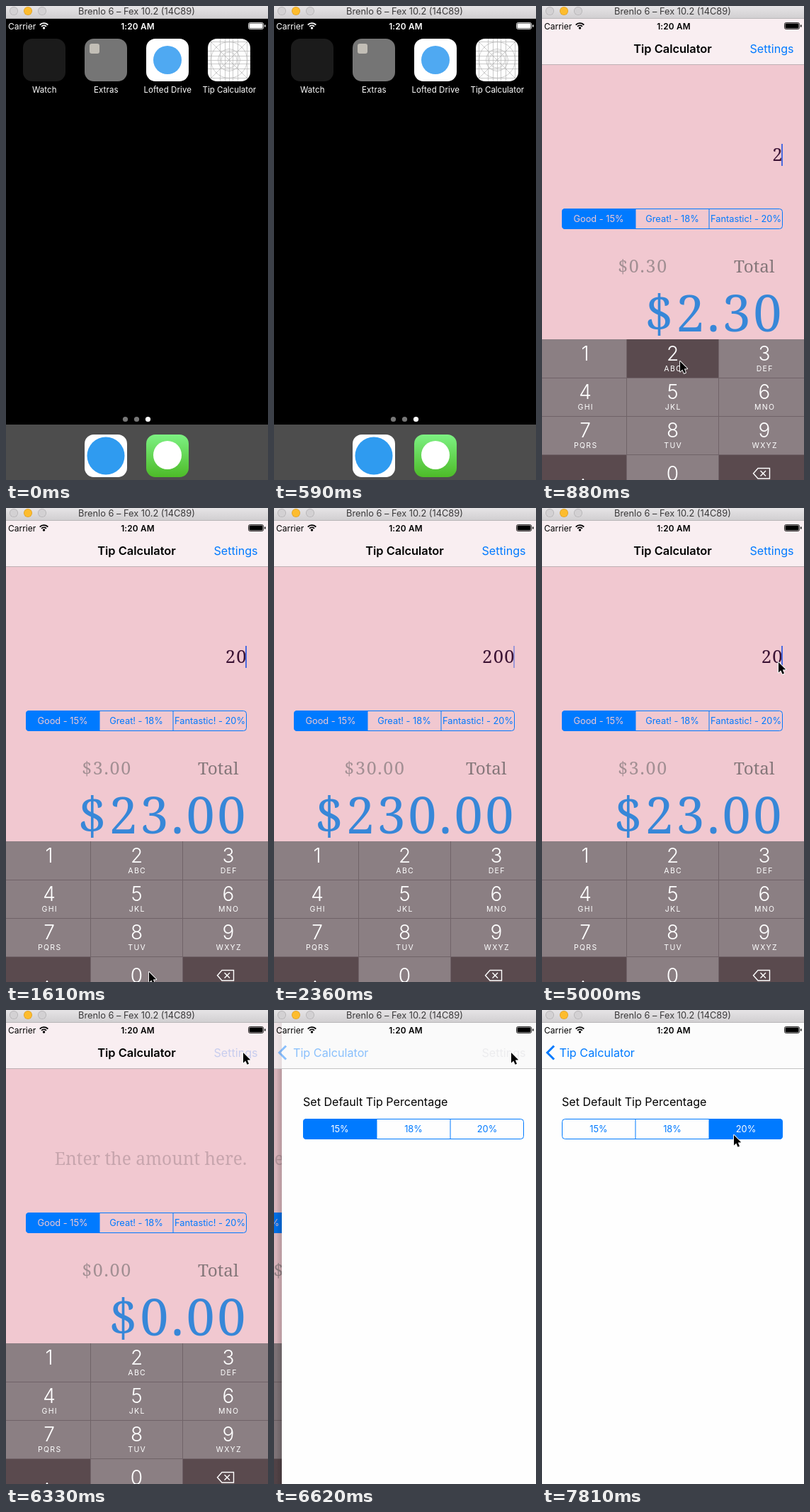
Write an HTML page with a canvas that moves like this. It is 370x667 px and loops after 8000 ms.

```html
<!DOCTYPE html>
<html lang="en">
<head>
<meta charset="utf-8">
<title>Tip Calculator</title>
<style>
  html, body { margin: 0; width: 100%; height: 100%; overflow: hidden; background: #000; }
  canvas { display: block; width: 370px; height: 667px; }
</style>
</head>
<body>
<canvas id="stage"></canvas>
<script>
const W = 370, H = 667, LOOP = 8000, TICK = 147.2;
const SANS = 'Inter, "Liberation Sans", sans-serif';
const SLAB = '"Noto Serif", "Liberation Serif", serif';
const BLUE = '#007aff', PINK = '#f1c8d0';

const canvas = document.getElementById('stage');
const dpr = window.devicePixelRatio || 1;
canvas.width = W * dpr;
canvas.height = H * dpr;
const ctx = canvas.getContext('2d');

// Step tables: [first tick, value]
const BILL = [[0, '2'], [10, '20'], [12, '200'], [34, '20'], [35, '2'], [36, '']];
const CARET = [[0, 1], [16, .5], [17, 0], [19, .5], [20, 1], [23, .5], [24, 0], [26, .5],
  [27, 1], [31, .5], [32, 0], [34, 1], [39, .5], [40, 0]];
const PRESSED_KEY = [[0, '2'], [7, ''], [10, '0'], [11, ''], [12, '0'], [13, '']];

// Pointer runs: [tick, x, y]
const POINTER = [
  [[6, 195, 500], [7, 196, 545], [9, 202, 653], [13, 202, 653]],
  [[19, 244, 470], [20, 268, 320], [22, 308, 81], [23, 304, 160], [26, 262, 538],
   [27, 295, 420], [28, 326, 270], [29, 334, 217], [38, 334, 217], [40, 337, 150],
   [42, 335, 60], [45, 335, 60], [48, 300, 130], [50, 271, 176], [60, 271, 176]]
];

const stepAt = (table, tick) => table.filter(([from]) => from <= tick).pop()[1];

function pointerAt(tick) {
  const run = POINTER.find(r => tick >= r[0][0] && tick <= r[r.length - 1][0]);
  if (!run) return null;
  const i = Math.max(1, run.findIndex(([at]) => at >= tick));
  const [t0, x0, y0] = run[i - 1], [t1, x1, y1] = run[i];
  const p = (tick - t0) / (t1 - t0);
  return [x0 + (x1 - x0) * p, y0 + (y1 - y0) * p];
}

function text(str, x, y, size, color, { align = 'left', weight = 400, font = SANS, gap = 0 } = {}) {
  ctx.font = `${weight} ${size}px ${font}`;
  ctx.letterSpacing = gap + 'px';
  ctx.textAlign = align;
  ctx.fillStyle = color;
  ctx.fillText(str, x, y);
}

function rect(x, y, w, h, color) {
  ctx.fillStyle = color;
  ctx.fillRect(x, y, w, h);
}

function round(x, y, w, h, r, color) {
  ctx.beginPath();
  ctx.roundRect(x, y, w, h, r);
  ctx.fillStyle = color;
  ctx.fill();
}

function disc(x, y, r, color) {
  ctx.beginPath();
  ctx.arc(x, y, r, 0, Math.PI * 2);
  ctx.fillStyle = color;
  ctx.fill();
}

function line(points, color, width = 1) {
  ctx.beginPath();
  points.forEach(([x, y]) => ctx.lineTo(x, y));
  ctx.strokeStyle = color;
  ctx.lineWidth = width;
  ctx.stroke();
}

function vertical(y0, y1, stops) {
  const g = ctx.createLinearGradient(0, y0, 0, y1);
  stops.forEach((c, i) => g.addColorStop(i / (stops.length - 1), c));
  return g;
}

function windowBar() {
  rect(0, 0, W, 18, vertical(0, 18, ['#e6e4e6', '#d0ced0']));
  rect(0, 17, W, 1, '#b9b7b9');
  for (const x of [11, 31, 51]) {
    const active = x === 31;
    disc(x, 7, 6, active ? '#dfa023' : '#b4b2b4');
    disc(x, 7, 5.2, active ? '#fdbc2e' : '#d3d1d3');
  }
  text('Brenlo 6 – Fex 10.2 (14C89)', 184.5, 12, 12.8, '#3a393a', { align: 'center' });
}

function statusBar(color) {
  text('Carrier', 3, 32.5, 12, color);
  text('1:20 AM', 186, 32.5, 11.8, color, { align: 'center', weight: 600, gap: .2 });
  ctx.strokeStyle = color;
  ctx.lineWidth = 1.8;
  for (const r of [4.6, 7.9]) {
    ctx.beginPath();
    ctx.arc(53.5, 32, r, -Math.PI * .76, -Math.PI * .24);
    ctx.stroke();
  }
  disc(53.5, 31, 1.7, color);
  ctx.beginPath();
  ctx.roundRect(342.5, 23.5, 21, 9, 2);
  ctx.lineWidth = .8;
  ctx.stroke();
  round(343.5, 24.5, 19, 7, 1, color);
  rect(365, 26.5, 1.5, 3, color);
}

function gridIcon(x, y) {
  const c = x + 30, m = y + 30, grey = '#b3b3b3';
  ctx.save();
  round(x, y, 60, 60, 13, '#fff');
  ctx.clip();
  for (const d of [4.5, 17.5, 24.5, 30.5, 35.5, 42.5, 55.5]) {
    line([[x + d, y], [x + d, y + 60]], grey, .7);
    line([[x, y + d], [x + 60, y + d]], grey, .7);
  }
  line([[x, y], [x + 60, y + 60]], grey, .7);
  line([[x + 60, y], [x, y + 60]], grey, .7);
  for (const r of [11, 15.5, 25.5]) {
    ctx.beginPath();
    ctx.arc(c, m, r, 0, Math.PI * 2);
    ctx.stroke();
  }
  ctx.restore();
}

function homeScreen() {
  rect(0, 18, W, H - 18, '#000');
  statusBar('#fff');
  round(24, 46, 60, 60, 13, '#1b1b1b');
  round(111, 46, 60, 60, 13, '#757575');
  round(118, 53, 14, 14, 3, '#c2beb6');
  round(198, 46, 60, 60, 13, '#fff');
  disc(228, 76, 20, '#4fa9f2');
  gridIcon(285, 46);
  ['Watch', 'Extras', 'Lofted Drive', 'Tip Calculator'].forEach((name, i) =>
    text(name, 54.3 + i * 87, 122, 11.5, '#fff', { align: 'center', gap: i === 3 ? 0 : .1 }));
  [168.5, 184.5, 200.5].forEach((x, i) => disc(x, 581.5, 3.6, i === 2 ? '#fff' : '#777'));
  rect(0, 589, W, 78, '#4d4d4d');
  round(111, 603, 60, 60, 13, '#fff');
  disc(141, 633, 26.5, '#2f9bf0');
  round(198, 603, 60, 60, 13, vertical(603, 663, ['#7df183', '#4dbb28']));
  disc(228, 632, 20, '#fff');
}

function segments(x, y, labels, selected, knockout, touched = -1) {
  const w = 312, h = 29, cell = w / 3;
  ctx.save();
  ctx.beginPath();
  ctx.roundRect(x, y, w, h, 4.5);
  ctx.clip();
  rect(x + selected * cell, y, cell, h, BLUE);
  if (touched >= 0) rect(x + touched * cell, y, cell, h, 'rgba(0,122,255,.2)');
  ctx.restore();
  ctx.beginPath();
  ctx.roundRect(x + .5, y + .5, w - 1, h - 1, 4);
  ctx.strokeStyle = BLUE;
  ctx.lineWidth = 1;
  ctx.stroke();
  labels.forEach((label, i) => {
    if (i) rect(Math.floor(x + i * cell) - .5, y, 1, h, BLUE);
    text(label, x + (i + .5) * cell, y + 19, 12.8, i === selected ? knockout : BLUE, { align: 'center' });
  });
}

function keypad(pressed) {
  const keys = [['1', ''], ['2', 'ABC'], ['3', 'DEF'], ['4', 'GHI'], ['5', 'JKL'], ['6', 'MNO'],
    ['7', 'PQRS'], ['8', 'TUV'], ['9', 'WXYZ'], ['.', ''], ['0', ''], ['del', '']];
  const edges = [0, 120, 250, W], centers = [61, 184.5, 314];
  keys.forEach(([digit, letters], i) => {
    const col = i % 3, row = Math.floor(i / 3), y = 469 + row * 54;
    const dark = digit === '.' || digit === 'del' || digit === pressed;
    rect(edges[col], y, edges[col + 1] - edges[col], 54, dark ? '#5a4a4e' : '#8b7f83');
    if (digit === 'del') return;
    const baseline = y + (row === 3 ? 36.5 : 30);
    text(digit, digit === '.' ? 58 : centers[col], baseline, 28, '#fff', { align: 'center', weight: 300 });
    text(letters, centers[col] + .7, y + 45, 10.5, '#fff', { align: 'center', gap: 1.3 });
  });
  for (const y of [523, 577, 631]) rect(0, y, W, 1, '#706368');
  for (const x of [119, 249]) rect(x, 469, 1, H - 469, '#706368');
  line([[305, 650.5], [321.5, 650.5], [321.5, 665], [305, 665], [298.5, 657.8], [305, 650.5], [307, 650.5]], '#fff', 1.4);
  line([[308.5, 654], [316, 661.5]], '#fff', 1.4);
  line([[316, 654], [308.5, 661.5]], '#fff', 1.4);
}

function calculatorBody(tick) {
  const bill = stepAt(BILL, tick), amount = Number(bill), tip = amount * .15;
  const money = n => '$' + n.toFixed(2);
  rect(0, 18, W, H - 18, PINK);
  if (bill) text(bill, 341, 218, 25.5, '#3b1233', { align: 'right', font: SLAB, weight: 300, gap: 1.4 });
  else text('Enter the amount here.', 340, 218, 24.5, '#c7a5ad', { align: 'right', font: SLAB, weight: 300 });
  ctx.globalAlpha = stepAt(CARET, tick);
  rect(338, 194, 2, 31, '#4a6be0');
  ctx.globalAlpha = 1;
  segments(28, 285, ['Good - 15%', 'Great! - 18%', 'Fantastic! - 20%'], 0, PINK);
  text(money(tip), 142.5, 375, 25, '#a28f93', { align: 'center', font: SLAB, weight: 300, gap: 1.7 });
  text('Total', 271, 375, 24.3, '#85777a', { font: SLAB, weight: 300 });
  text(money(amount + tip), 342, 458, 72, '#3787d8', { align: 'right', font: SLAB, weight: 300, gap: 3.5 });
  keypad(stepAt(PRESSED_KEY, tick));
}

function navBar(fill, edge) {
  rect(0, 18, W, 64, fill);
  rect(0, 82, W, 1, edge);
}

function calculatorScreen(tick) {
  calculatorBody(tick);
  navBar('#f9eef1', '#bfb0b4');
  statusBar('#000');
  text('Tip Calculator', 184.5, 66, 16.4, '#000', { align: 'center', weight: 600 });
  text('Settings', 355.5, 66, 16.1, tick === 43 ? '#c8cdee' : BLUE, { align: 'right' });
}

function settingsScreen(tick) {
  const sliding = tick === 45, offset = sliding ? 13 : 0;
  if (sliding) {
    ctx.save();
    ctx.translate(-108, 0);
    calculatorBody(tick);
    ctx.restore();
    rect(0, 18, W, H - 18, 'rgba(0,0,0,.1)');
    const shade = ctx.createLinearGradient(3, 0, 11, 0);
    shade.addColorStop(0, 'rgba(0,0,0,0)');
    shade.addColorStop(1, 'rgba(0,0,0,.16)');
    rect(3, 18, 8, H - 18, shade);
  }
  rect(sliding ? 11 : 0, 18, W, H - 18, '#fefefe');
  navBar(sliding ? 'rgba(250,249,249,.7)' : '#fcfcfc', '#c4c4c4');
  statusBar('#000');
  ctx.globalAlpha = sliding ? .45 : 1;
  line([[17, 50.5], [7.5, 60], [17, 69.5]], BLUE, 3);
  text('Tip Calculator', sliding ? 27 : 24.5, 66, 16.2, BLUE);
  ctx.globalAlpha = 1;
  if (sliding) text('Settings', 355.5, 66, 16.1, '#ececee', { align: 'right' });
  text('Set Default Tip Percentage', 28 + offset, 134.5, 16.1, '#000');
  segments(28 + offset, 153, ['15%', '18%', '20%'], tick >= 53 ? 2 : 0, '#fff', tick === 52 ? 2 : -1);
}

function pointer(x, y) {
  ctx.save();
  ctx.translate(x, y);
  ctx.beginPath();
  [[0, 0], [0, 14.5], [3.3, 11.4], [5.6, 16.8], [8, 15.8], [5.8, 10.5], [10.2, 10.3]]
    .forEach(([px, py]) => ctx.lineTo(px, py));
  ctx.closePath();
  ctx.lineJoin = 'round';
  ctx.lineWidth = 1.8;
  ctx.strokeStyle = '#fff';
  ctx.stroke();
  ctx.fillStyle = '#000';
  ctx.fill();
  ctx.restore();
}

function draw(now) {
  const tick = Math.floor((now % LOOP) / TICK + .13);
  ctx.setTransform(dpr, 0, 0, dpr, 0, 0);
  if (tick < 6) homeScreen();
  else if (tick < 45) calculatorScreen(tick);
  else settingsScreen(tick);
  windowBar();
  const at = pointerAt(tick);
  if (at) pointer(...at);
}

const start = performance.now();
function frame() {
  draw(performance.now() - start);
  requestAnimationFrame(frame);
}
frame();
</script>
</body>
</html>
```
